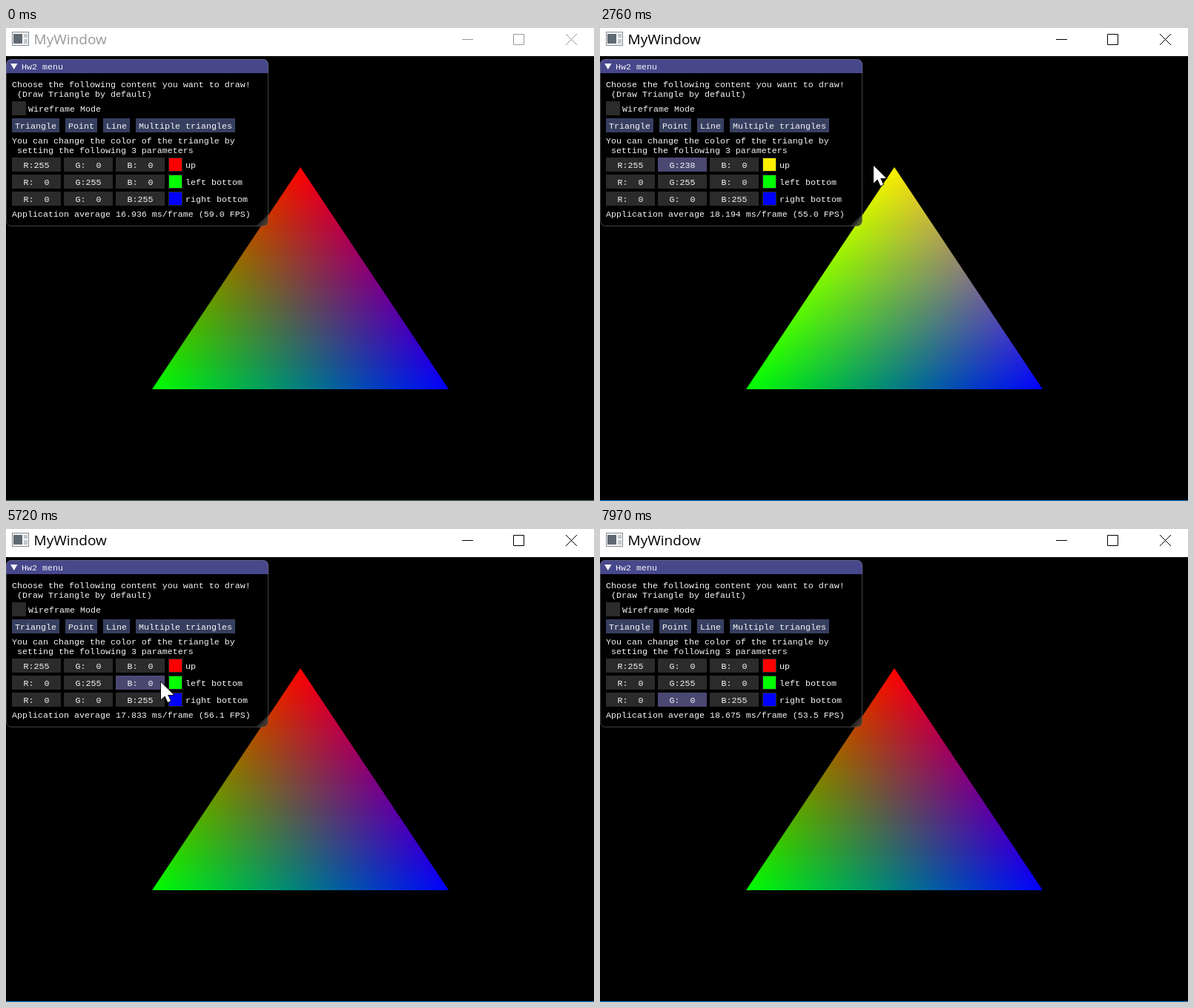
Write an HTML page with a canvas that moves like this. It is 793 px wide and 639 px high and loops after 8000 ms.

```html
<!DOCTYPE html>
<html lang="en">
<head>
<meta charset="utf-8">
<title>MyWindow</title>
<style>
  html, body { margin: 0; width: 100%; height: 100%; overflow: hidden; background: #000; }
  canvas, svg { position: absolute; left: 0; top: 0; width: 793px; height: 639px; display: block; }
  #menu text { font: 11.665px "Liberation Mono", monospace; fill: #f4f4f4; white-space: pre; }
  .title { font: 19px "Open Sans", sans-serif; }
  .button { fill: #373f60; }
  .field { fill: #2b2b2b; }
  .field.hover { fill: #303046; }
  .field.active { fill: #4a4871; }
  #frame { color: #999; --edge: #587064; }
  #frame.focused { color: #000; --edge: #1883d7; }
</style>
</head>
<body>
<canvas width="793" height="639"></canvas>
<svg viewBox="0 0 793 639">
  <g id="frame">
    <rect width="793" height="38" fill="#fff"/>
    <rect y="638" width="793" height="1" style="fill:var(--edge)"/>
    <rect x="8.5" y="5.5" width="22" height="18" fill="#f4f5f6" stroke="#868b90"/>
    <rect x="10" y="8" width="12" height="13" fill="#5f6972"/>
    <path d="M24 8h5v5h-5zM24 15h5v6h-5z" fill="#c3c8cc"/>
    <text class="title" x="37.500" y="22" fill="currentColor">MyWindow</text>
    <path d="M615 15.500h15M684.500 8.500h14v14h-14zM755 8l15 15M770 8l-15 15" fill="none" stroke="currentColor"/>
  </g>
  <g id="menu">
    <rect x=".5" y="42.5" width="353" height="225" rx="7" fill="#000" fill-opacity=".8"/>
    <path d="M0 61V49a7 7 0 0 1 7-7h340a7 7 0 0 1 7 7v12z" fill="#47478c"/>
    <path d="M338 267l15-15v9a6 6 0 0 1-6 6z" fill="#fff" fill-opacity=".17"/>
    <rect x=".5" y="42.5" width="353" height="225" rx="7" fill="none" stroke="#808080" stroke-opacity=".5"/>
    <path d="M6 48h9.500l-4.750 8z" fill="#f4f4f4"/>
    <text x="21" y="56">Hw2 menu</text>
    <text x="8" y="80">Choose the following content you want to draw!</text>
    <text x="8" y="93"> (Draw Triangle by default)</text>
    <rect class="field" x="8" y="99" width="19" height="19"/>
    <text x="30" y="113">Wireframe Mode</text>
    <text x="8" y="156">You can change the color of the triangle by</text>
    <text x="8" y="169"> setting the following 3 parameters</text>
    <text id="stats" x="8" y="255"></text>
  </g>
  <path id="cursor" d="M0 0V23.500L5.300 18.500L9.200 27L13 25.300L9.200 17H17Z"
    fill="#fff" stroke="#000" stroke-width="1.5" paint-order="stroke"/>
</svg>
<script>
const LOOP = 8000, FIRST = 70, STEP = 78.2;
const RED = 0, GREEN = 1, BLUE = 2;

// Each drag pulls a field's value to the right, then back to zero (times in ms).
const drags = [
  { row: 0, channel: GREEN, press: 2463, turn: 2953, release: 3354, from: 131, reach: 570, to: 104 },
  { row: 1, channel: BLUE, press: 4370, turn: 5043, release: 5940, from: 196, reach: 551, to: 84 },
  { row: 2, channel: GREEN, press: 6795, turn: 7340, release: 7900, from: 107, reach: 480, to: -40 }
];
const dragY = row => 186 + 21 * row;

// Cursor path: the drags, plus where it enters and rests between them.
const path = drags.flatMap(d => [
  [d.press, d.from, dragY(d.row)], [d.turn, d.reach, dragY(d.row)], [d.release, d.to, dragY(d.row)]
]).concat([
  [620, 335, 348], [930, 253, 258], [2025, 147, 184], [3670, 66, 203], [4058, 111, 206]
]).sort((a, b) => a[0] - b[0]);
const enter = path[0][0];

const frameTimes = [
  [0, 16.936], [2025, 17.904], [2729, 18.194], [4058, 18.111], [4840, 17.628], [6795, 18.093], [7968, 18.675]
];

const clamp = (v, lo, hi) => Math.min(hi, Math.max(lo, v));

function sample(keys, t) {
  const next = clamp(keys.findIndex(key => key[0] >= t), -1, keys.length);
  if (next < 0) return keys.at(-1).slice(1);
  if (next === 0) return keys[0].slice(1);
  const [t0, ...a] = keys[next - 1], [t1, ...b] = keys[next];
  return a.map((v, i) => v + (b[i] - v) * (t - t0) / (t1 - t0));
}

function draggedValue(d, x, t) {
  if (t < d.press || t > d.release) return 0;
  const raw = t < d.turn ? x - d.from : Math.min(255, d.reach - d.from) + x - d.reach;
  return Math.round(clamp(raw, 0, 255));
}

const byId = id => document.getElementById(id);
const menu = byId("menu"), frame = byId("frame"), stats = byId("stats"), cursor = byId("cursor");

function add(tag, attrs, text = "") {
  const node = document.createElementNS("http://www.w3.org/2000/svg", tag);
  for (const name in attrs) node.setAttribute(name, attrs[name]);
  node.textContent = text;
  return menu.appendChild(node);
}

let left = 8;
for (const label of ["Triangle", "Point", "Line", "Multiple triangles"]) {
  const width = label.length * 7 + 8;
  add("rect", { class: "button", x: left, y: 122, width, height: 19 });
  add("text", { x: left + 4, y: 136 }, label);
  left += width + 8;
}

const rows = ["up", "left bottom", "right bottom"].map((label, row) => {
  const y = 175 + row * 23;
  const fields = [..."RGB"].map((name, i) => {
    const x = 8 + i * 70;
    const box = add("rect", { class: "field", x, y, width: 66, height: 19 });
    return { name, x, y, box, text: add("text", { x: x + 15.5, y: y + 14 }) };
  });
  const swatch = add("rect", { x: 219.5, y: y + .5, width: 18, height: 18, stroke: "#2b2b2b" });
  add("text", { x: 242, y: y + 14 }, label);
  return { fields, swatch };
});

const ctx = document.querySelector("canvas").getContext("2d");
const corners = [[397, 188], [197, 488], [597, 488]];

// Each corner's colour fades to black at its opposite side; the three are summed.
function drawTriangle(colors) {
  ctx.clearRect(0, 0, 793, 639);
  ctx.globalCompositeOperation = "lighter";
  ctx.beginPath();
  corners.forEach(([x, y]) => ctx.lineTo(x, y));
  ctx.closePath();
  ctx.fillStyle = "#000";
  ctx.fill();
  corners.forEach(([x, y], i) => {
    const [bx, by] = corners[(i + 1) % 3], [cx, cy] = corners[(i + 2) % 3];
    const dx = cx - bx, dy = cy - by;
    const p = ((x - bx) * dx + (y - by) * dy) / (dx * dx + dy * dy);
    const fade = ctx.createLinearGradient(x, y, bx + dx * p, by + dy * p);
    fade.addColorStop(0, `rgb(${colors[i]})`);
    fade.addColorStop(1, "#000");
    ctx.fillStyle = fade;
    ctx.fill();
  });
}

function render(t) {
  const [x, y] = sample(path, t);
  const colors = [RED, GREEN, BLUE].map(c => [0, 1, 2].map(i => i === c ? 255 : 0));
  for (const d of drags) colors[d.row][d.channel] = draggedValue(d, x, t);
  const held = drags.find(d => t >= d.press && t <= d.release + STEP);

  rows.forEach(({ fields, swatch }, row) => {
    fields.forEach((field, i) => {
      const over = x >= field.x && x < field.x + 66 && y >= field.y && y < field.y + 19;
      const active = held && held.row === row && held.channel === i;
      field.box.setAttribute("class", "field" + (active ? " active" : over && !held ? " hover" : ""));
      field.text.textContent = field.name + ":" + String(colors[row][i]).padStart(3);
    });
    swatch.setAttribute("fill", `rgb(${colors[row]})`);
  });

  const [ms] = sample(frameTimes, t);
  stats.textContent = `Application average ${ms.toFixed(3)} ms/frame (${(1000 / ms).toFixed(1)} FPS)`;
  frame.setAttribute("class", t >= drags[0].press ? "focused" : "");
  cursor.setAttribute("visibility", t >= enter - STEP ? "visible" : "hidden");
  cursor.setAttribute("transform", `translate(${Math.round(x)} ${Math.round(y)})`);
  drawTriangle(colors);
}

let shown;
function tick() {
  const time = performance.now() % LOOP;
  const step = Math.floor((time - FIRST) / STEP + .15);
  if (step !== shown) {
    shown = step;
    render(FIRST + step * STEP);
  }
  requestAnimationFrame(tick);
}
tick();
</script>
</body>
</html>
```
